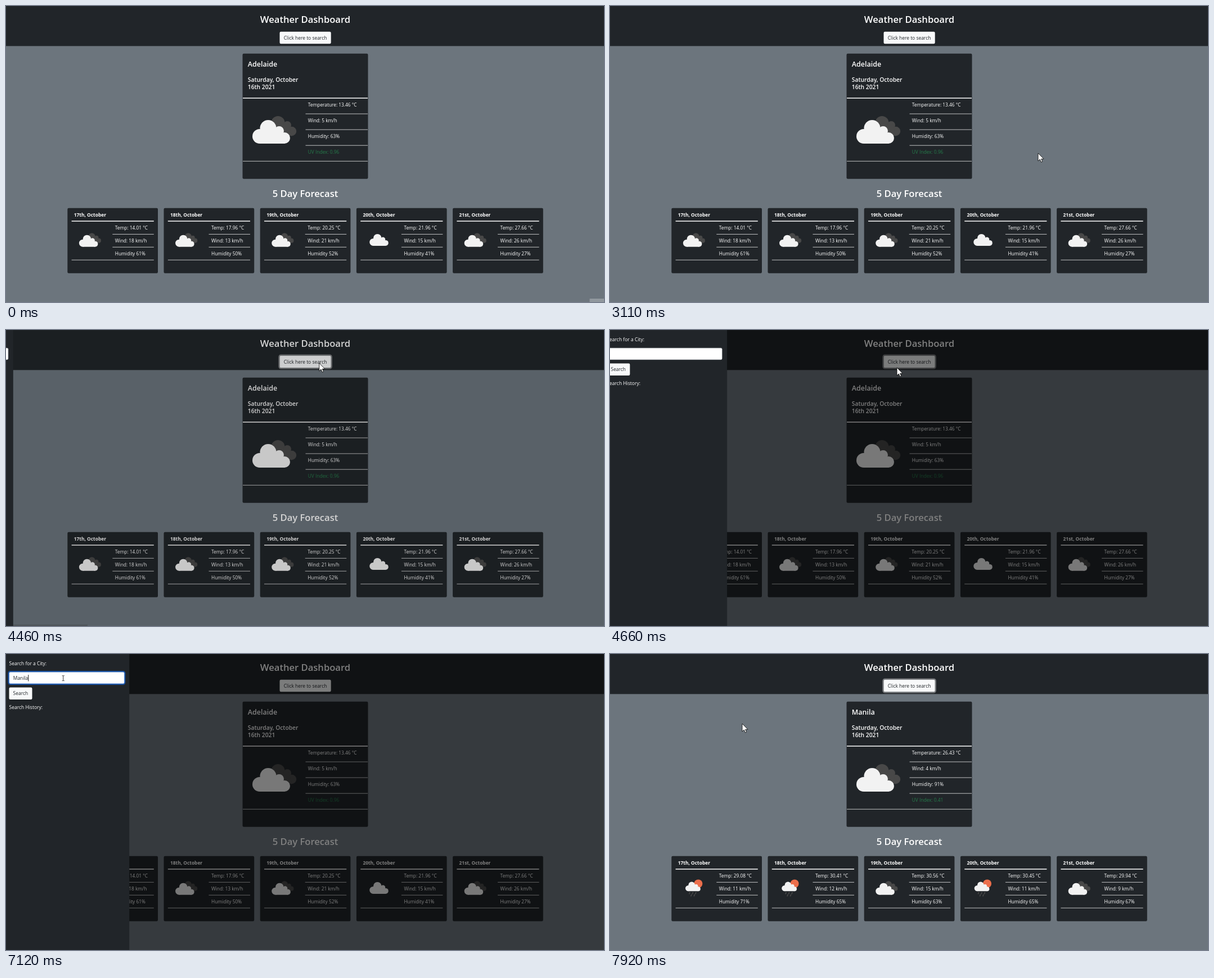
Recreate the animation shown at these times as an HTML page. Size 1063x527 px, loop 7.99 s.

```html
<!DOCTYPE html>
<html lang="en">
<head>
<meta charset="utf-8">
<title>Weather Dashboard</title>
<style>
  html, body { margin: 0; width: 100%; height: 100%; overflow: hidden; background: #6c757d; }
  svg { display: block; width: 100%; height: 100%; font: 8.35px "Open Sans", "Noto Sans", sans-serif; }
  text { fill: #fff; white-space: pre; }
  .semi { font-weight: 600; }
  .mid { text-anchor: middle; font-size: 16.6px; }
  .bold { font-weight: 700; font-size: 8.4px; }
  .ink { fill: #212529; font-size: 8.45px; }
  .label { font-size: 8.5px; }
  .dark { fill: #212529; }
  .light { fill: #f8f9fa; }
  .line { stroke: #fff; stroke-opacity: .8; stroke-width: .9; }
  .head { stroke: #fff; stroke-width: 1.4; }
</style>
</head>
<body>
<svg viewBox="0 0 1063 527">
  <defs>
    <g id="white" fill="#f2f2f2">
      <circle cx="-20.5" cy="8" r="13"/><circle cx="-5.5" cy="-6.5" r="14.5"/>
      <circle cx="14" cy="-1.5" r="8.5"/><circle cx="23.5" cy="11" r="10"/>
      <path d="M-20 -3H18L24 5V21H-20.5Z"/>
    </g>
    <g id="clouds">
      <g fill="#484848">
        <circle cx="6.5" cy="-12.5" r="12"/><circle cx="23" cy="-8.5" r="7"/>
        <circle cx="31" cy="2.5" r="8.2"/><path d="M6 -10H25L31 10.7H6Z"/>
      </g>
      <use href="#white" x="-5.5" y="3.5"/>
    </g>
    <g id="cloud"><use href="#white"/></g>
    <g id="rain">
      <circle cx="15" cy="-15" r="15" fill="#eb6e4b"/>
      <use href="#white" transform="translate(-4 -5) scale(.8)"/>
      <path d="M-15 16l-2 5M-4 16l-2 5M7 16l-2 5M-9 24l-2 5M2 24l-2 5" stroke="#484848" stroke-width="3.2" stroke-linecap="round"/>
    </g>
  </defs>

  <rect width="1063" height="527" fill="#6c757d"/>
  <rect class="dark" width="1063" height="71.3"/>
  <text class="semi mid" x="532" y="30">Weather Dashboard</text>
  <rect id="ring" x="485.4" y="44.7" width="93.4" height="23.6" rx="3.2" fill="none" stroke="#d3d4d5" stroke-opacity=".5" stroke-width="2.2"/>
  <rect class="light" x="486.5" y="45.8" width="91.2" height="21.4" rx="2.2"/>
  <text class="ink" x="493.8" y="59.7">Click here to search</text>
  <text class="semi mid" x="532" y="340">5 Day Forecast</text>
  <g id="before"></g>
  <g id="after"></g>
  <rect id="corner" x="1037.5" y="521" width="25.5" height="6" fill="#91989e"/>
  <rect id="strip" y="524.6" height="2.4" fill="#3b3d3f"/>
  <rect id="shade" width="1063" height="527"/>

  <g id="panel">
    <rect class="dark" width="219.2" height="527"/>
    <text class="label" x="5.5" y="19.7">Search for a City:</text>
    <rect id="glow" x="4.6" y="31.1" width="206.6" height="22.6" rx="3" fill="none" stroke="#0d6efd" stroke-opacity=".55" stroke-width="2.4"/>
    <rect id="field" x="5.8" y="32.2" width="204.4" height="20.5" rx="2" fill="#fff" stroke="#ced4da" stroke-width=".6"/>
    <text id="city" class="ink" x="12.8" y="45.7"></text>
    <rect id="caret" y="37" width=".9" height="11.5"/>
    <rect class="light" x="5.5" y="59.5" width="41" height="21.4" rx="2.2"/>
    <text class="ink" x="12.6" y="73.4">Search</text>
    <text class="label" x="5.5" y="97.5">Search History:</text>
  </g>

  <path id="arrow" d="M0 0V14L3.3 11 5.4 16 7.7 15 5.6 10.3H10Z" fill="#fff" stroke="#000" stroke-width=".8"/>
  <path id="beam" d="M-2 -4.5H-.5L0 -4 .5 -4.5H2M0 -4V4M-2 4.5H-.5L0 4 .5 4.5H2" fill="none" stroke="#222" stroke-width=".9"/>
</svg>
<script>
const LOOP = 7990, PANEL = 219.2;
const $ = id => document.getElementById(id);
const set = (id, name, value) => $(id).setAttribute(name, value);
const show = (id, on) => set(id, 'visibility', on ? 'visible' : 'hidden');
const ramp = (t, start, length) => Math.min(1, Math.max(0, (t - start) / length));
const ease = p => p * p * (3 - 2 * p);

const text = (x, y, content, attrs = '') => `<text x="${x}" y="${y}" ${attrs}>${content}</text>`;
const line = (x1, x2, y, kind = 'line') => `<path class="${kind}" d="M${x1} ${y}H${x2}"/>`;
const box = (x, y, w, h) => `<rect class="dark" x="${x}" y="${y}" width="${w}" height="${h}" rx="2.2"/>`;
const icon = (name, x, y, size) => `<use href="#${name}" transform="translate(${x} ${y}) scale(${size})"/>`;

function today(city, temp, wind, humidity, uv) {
  const rows = [`Temperature: ${temp} °C`, `Wind: ${wind} km/h`, `Humidity: ${humidity}%`, `UV Index: ${uv}`];
  return box(420.5, 84.8, 223, 223) +
    text(429.8, 107.5, city, 'class="semi" font-size="12.5"') +
    text(429.8, 134.5, 'Saturday, October', 'class="semi" font-size="10.3"') +
    text(429.8, 147.7, '16th 2021', 'class="semi" font-size="10.3"') +
    line(421, 643, 164, 'head') + icon('clouds', 477, 220.5, 1) +
    rows.map((row, i) => text(536.8, 179 + i * 28.1, row, i == 3 ? 'style="fill:#257d4b"' : '') +
      line(i == 3 ? 421 : 532.5, 643, 192 + i * 28.1)).join('');
}

function day([name, temp, wind, humidity], i) {
  const x = 109.3 + i * 171.2;
  const rows = [`Temp: ${temp} °C`, `Wind: ${wind} km/h`, `Humidity ${humidity}%`];
  return box(x, 359.8, 160.7, 116) +
    text(x + 11.5, 374.8, ['17th', '18th', '19th', '20th', '21st'][i] + ', October', 'class="bold"') +
    line(x + 7.3, x + 153.5, 383, 'head') + icon(name, x + 40.1, 416.4, .5) +
    rows.map((row, j) => text(x + 84.5, 398.2 + j * 22.9, row) +
      line(x + (j == 2 ? 7.3 : 80), x + 153.5, 406.4 + j * 22.9)).join('');
}

$('before').innerHTML = today('Adelaide', '13.46', 5, 63, '0.96') + [
  ['clouds', '14.01', 18, 61], ['clouds', '17.96', 13, 50], ['clouds', '20.25', 21, 52],
  ['cloud', '21.96', 15, 41], ['clouds', '27.66', 26, 27]].map(day).join('');
$('after').innerHTML = today('Manila', '26.43', 4, 91, '0.41') + [
  ['rain', '29.08', 11, 71], ['rain', '30.41', 12, 65], ['clouds', '30.56', 15, 63],
  ['rain', '30.45', 11, 65], ['clouds', '29.94', 9, 67]].map(day).join('');

// Pointer path: time, x, y
const path = [
  [70, 1050, 508], [250, 985, 445], [600, 785, 280], [730, 756, 256], [860, 763, 262],
  [2849, 763, 262], [2850, 761, 262], [3600, 761, 262], [3750, 742, 243], [4250, 573, 76],
  [4390, 557, 59], [4460, 557, 59], [4660, 511, 67], [5000, 180, 50], [5190, 102, 43],
  [7120, 102, 43], [7380, 30, 70], [7600, 30, 70], [7850, 159, 105], [7920, 235, 124], [LOOP, 235, 124]];
const keys = [6190, 6260, 6330, 6460, 6650, 6720];

function pointer(t) {
  const i = Math.max(1, path.findIndex(p => p[0] > t));
  const [a, b] = [path[i - 1], path[i]];
  const p = ramp(t, a[0], b[0] - a[0]);
  return [a[1] + (b[1] - a[1]) * p, a[2] + (b[2] - a[2]) * p];
}

function draw(t) {
  const done = t >= 7650;
  show('before', !done);
  show('after', done);
  show('corner', t < 70);

  const opening = t >= 4400;
  set('strip', 'width', opening ? 145 : 353);
  set('strip', 'opacity', opening ? (t < 4530 ? .3 : 0) : t >= 2050 ? 1 - ramp(t, 2380, 200) : 0);

  const open = ease(ramp(t, 4420, 279)) - ease(ramp(t, 7480, 280));
  set('panel', 'transform', `translate(${(open - 1) * PANEL} 0)`);
  show('panel', open > 0);
  set('shade', 'opacity', .5 * (ramp(t, 4409, 150) - ramp(t, 7480, 150)));
  set('ring', 'opacity', ramp(t, 4360, 50) - ramp(t, 4720, 150) + ramp(t, 7780, 140));

  const focus = ease(ramp(t, 5260, 200)) - ramp(t, 7400, 100);
  set('glow', 'opacity', focus);
  set('field', 'stroke', focus > .5 ? '#86b7fe' : '#ced4da');
  $('city').textContent = 'Manila'.slice(0, keys.filter(k => t >= k).length);
  set('caret', 'x', 12.9 + $('city').getComputedTextLength());
  show('caret', open > 0 && t >= 5280 && t < 7400 && (t < 5860 || t >= 6190));

  const [x, y] = pointer(t);
  const typing = open > 0 && x > 5 && x < 210 && y > 32 && y < 53;
  show('arrow', t >= 70 && !typing);
  show('beam', typing);
  for (const id of ['arrow', 'beam']) set(id, 'transform', `translate(${x} ${y})`);
}

const start = performance.now();
function tick() {
  draw((performance.now() - start) % LOOP);
  requestAnimationFrame(tick);
}
tick();
</script>
</body>
</html>
```
